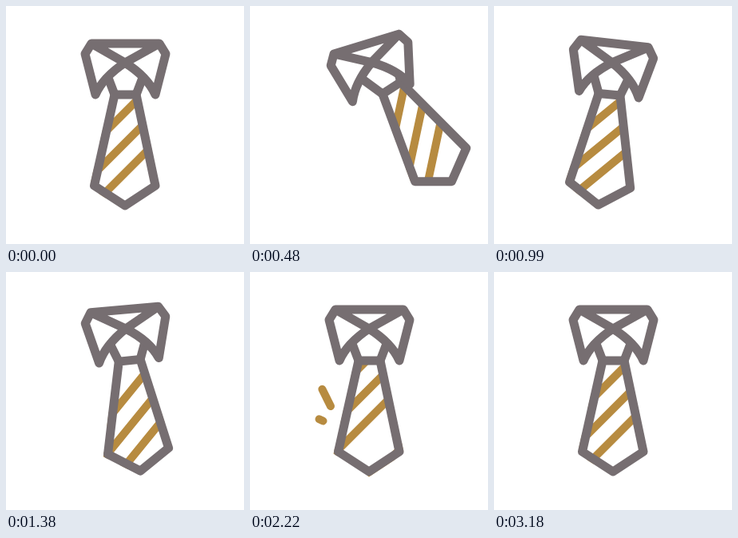
These frames come from a looping animation (298 by 298 pixels, 3.6 s). An HTML page:

```html
<!DOCTYPE html>
<html lang="en">
<head>
<meta charset="utf-8">
<title>Swinging tie</title>
<style>
  html, body { margin: 0; width: 100%; height: 100%; overflow: hidden; background: #fff; }
  svg { display: block; width: 100vw; height: 100vh; }
  .ink { fill: none; stroke: #766e71; stroke-width: 11; stroke-linecap: round; stroke-linejoin: round; }
  .leaf { fill: #fff; }
  .gold { fill: none; stroke: #b78b40; stroke-width: 10; }
  .spark { stroke-linecap: round; }
</style>
</head>
<body>
<svg viewBox="0 0 298 298">
  <defs>
    <clipPath id="cloth"><path d="M136 108H163L167.500 111L193 227.500L149 256.500L104.500 227.500L131 111Z"/></clipPath>
  </defs>
  <path class="gold spark" id="long"/>
  <path class="gold spark" id="short"/>
  <g id="tie">
    <g clip-path="url(#cloth)">
      <path class="gold stripes" id="leaving"/>
      <path class="gold stripes" id="coming"/>
    </g>
    <path class="ink" d="M136 111H163L187 225L149 250L110.500 225Z"/>
    <path class="ink" d="M125 82L136 111M174 82L163 111"/>
  </g>
  <g id="collar">
    <path class="leaf" d="M107 47L99 60L112 111C119 95 131 83 149 71Z"/>
    <path class="leaf" d="M192 47L200 60L187 111C180 95 168 83 149 71Z"/>
    <path class="ink" d="M107 47H192L200 60L187 111C180 95 168 83 149 71L107 47L99 60L112 111C119 95 131 83 149 71L192 47"/>
  </g>
</svg>
<script>
const LOOP = 3600;
const PIVOT = "149.500 60";
const $ = id => document.getElementById(id);

// [time, angle] turning points of each swing
const tieSwing = [[0, 0], [670, -40.5], [1130, 18], [1450, -8.9], [1790, 5], [2090, 0]];
const collarSwing = [[0, 0], [570, -18], [1095, 9], [1400, -5.2], [1690, 2.2], [1970, 0]];

const clamp = v => Math.min(1, Math.max(0, v));
const span = (t, from, to) => clamp((t - from) / (to - from));
const easeOut = p => 1 - (1 - p) ** 2;
const easeInOut = p => (1 - Math.cos(Math.PI * p)) / 2;

function swing(keys, t) {
  for (let i = 1; i < keys.length; i++) {
    const [t0, a0] = keys[i - 1], [t1, a1] = keys[i];
    if (t < t1) return a0 + (a1 - a0) * easeInOut(span(t, t0, t1));
  }
  return 0;
}

// Diagonal stripes lie on x + y = c
const stripes = [282, 320.5, 358].map(c => `M80 ${c - 80}L220 ${c - 220}`).join("");
document.querySelectorAll(".stripes").forEach(el => el.setAttribute("d", stripes));

function slide(id, dy) {
  $(id).setAttribute("transform", `translate(0 ${dy})`);
}

function turn(id, angle) {
  $(id).setAttribute("transform", `rotate(${angle} ${PIVOT})`);
}

// The outer end runs out first, then the inner end follows it
function spark(id, t, [x0, y0, x1, y1], [out0, out1, in0, in1]) {
  const head = easeOut(span(t, out0, out1));
  const tail = easeInOut(span(t, in0, in1));
  const at = p => `${x0 + (x1 - x0) * p} ${y0 + (y1 - y0) * p}`;
  $(id).setAttribute("d", head > tail ? `M${at(tail)}L${at(head)}` : "");
}

function draw(t) {
  turn("tie", swing(tieSwing, t));
  turn("collar", swing(collarSwing, t));

  const gone = Math.max(0, t - 1230);
  slide("leaving", 51 * (gone / 450) ** 1.165);
  const left = Math.max(0, 3190 - t);
  slide("coming", -25 * (left / 970) ** 2.5);

  spark("long", t, [101, 168, 85, 136], [2090, 2400, 2480, 2860]);
  spark("short", t, [91.5, 186.500, 62, 173], [2180, 2640, 2640, 3000]);
}

let start;
function tick(now) {
  start ??= now;
  draw((now - start) % LOOP);
  requestAnimationFrame(tick);
}
draw(0);
requestAnimationFrame(tick);
</script>
</body>
</html>
```
